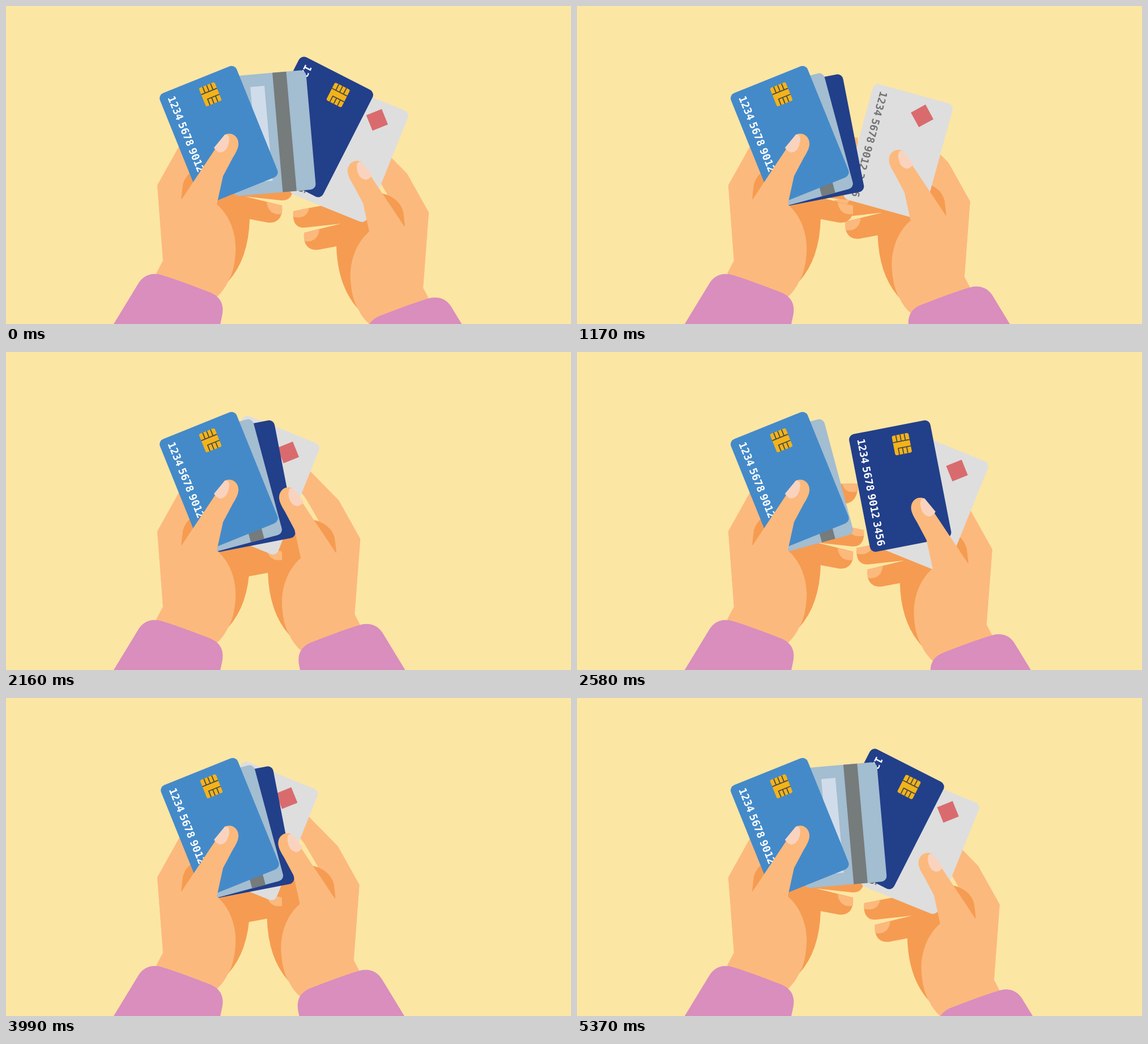
Animation of 997 by 561 pixels, one loop 5.4 s. Source, as an HTML page:

```html
<!DOCTYPE html>
<html lang="en">
<head>
<meta charset="utf-8">
<title>Passing cards</title>
<style>
  html, body { margin: 0; width: 100%; height: 100%; overflow: hidden; background: #fce6a4; }
  svg { display: block; width: 100vw; height: 100vh; }
  text { font: bold 18.4px "DejaVu Sans Mono", "Noto Sans Mono", monospace; word-spacing: -6px; white-space: pre; }
  .skin { fill: #fcb97d; }
  .shade { fill: #f59c52; }
  .nail { fill: #fad3bf; }
  .cuff { fill: #d98ebe; }
</style>
</head>
<body>
<svg viewBox="0 0 997 561" preserveAspectRatio="none">
  <defs>
    <rect id="plate" x="-73" y="-105.7" width="146" height="211.4" rx="10"/>
    <text id="digits" transform="translate(-59 -95) rotate(90)">1234 5678 9012 3456</text>
    <g id="chip">
      <rect x="-15" y="-17.5" width="30" height="35" rx="3" fill="#f2b31b"/>
      <path d="M-15-5.5H15M-7.5-17.5v12M0-17.5v12M7.5-17.5v12M15 6H-7.5V17.5M0 6V17.5M7.5 6V17.5"
            fill="none" stroke="#4a4a48" stroke-width="1.8"/>
    </g>

    <!-- fingers and palm behind the cards -->
    <g id="handBack">
      <path class="skin" d="M277 449L267 316 305 248 367 185 440 181Q455 196 440 211L405 214Q376 224 362 247L341 283 335 330 310 400Z"/>
      <path class="shade" d="M392 486Q428 446 430 376L462 382C480 384 489 372 487 352L422 336 486 343C502 344 508 332 506 314L466 306 414 297Q420 281 447 271L477 267C491 263 497 249 495 232L432 233Q420 236 410 247L375 300 352 282Q319 289 312 315L309 341 340 400Z"/>
      <path class="skin" d="M460 346L487 352 487 367Q463 370 460 346ZM478 308L506 314 506 324Q482 329 478 308ZM468 233L495 232 494 246Q474 251 468 233Z"/>
    </g>

    <!-- palm and thumb in front of the cards -->
    <g id="handFront">
      <path class="skin" d="M310 341L386 227C400 221 412 232 410 246Q409 254 400 268L383 300 372 350C398 372 407 408 405 435Q403 468 392 486Q384 503 371 514L340 530 265 472 277 449 267 316Z"/>
      <path class="nail" d="M367 250L386 227Q394 225 394 236Q392 257 378 258.5Q371 257 367 250Z"/>
    </g>
    <path id="cuff" class="cuff" d="M151 625L232 492Q244 470 268 473Q290 478 362 506Q388 518 381 548L372 590 366 625Z"/>
  </defs>

  <rect width="997" height="561" fill="#fce6a4"/>
  <g class="rightHand"><use href="#handBack"/></g>
  <use href="#handBack"/>

  <g id="grey">
    <use href="#plate" fill="#dedede"/>
    <use href="#digits" fill="#727476"/>
    <rect x="-14.7" y="-14.7" width="29.4" height="29.4" fill="#d96b6e" transform="translate(24 -72) rotate(46)"/>
  </g>
  <g id="navy">
    <use href="#plate" fill="#223f8a"/>
    <use href="#digits" fill="#fff"/>
    <use href="#chip" x="17" y="-72"/>
  </g>
  <g id="pale">
    <use href="#plate" fill="#a3bdd1"/>
    <rect x="-27" y="-84" width="25" height="168" fill="#d0dcea"/>
    <rect x="14" y="-105.7" width="24.5" height="211.4" fill="#767b7b"/>
  </g>
  <g id="blue">
    <use href="#plate" fill="#448ac9"/>
    <use href="#digits" fill="#fff"/>
    <use href="#chip" x="13.2" y="-72.5"/>
  </g>

  <use href="#handFront"/>
  <use href="#cuff"/>
  <g class="rightHand">
    <use href="#handFront"/>
    <use href="#cuff" x="-6.5" y="-6.5"/>
  </g>
</svg>
<script>
const LOOP = 5400;
const stops = [0, 760, 1425, 2105, 2625, 2990, 3510, 3950, 4496, 4930, 5380];

// Poses [x, y, angle]: f fanned, s stacked, r back at the stack, o pulled out.
// Each route names the pose reached at every stop.
const hand = {
  route: "fsorororosf",
  f: [0, 0, 0], s: [-140, -27, 0], r: [-124, -35, 0], o: [-11.3, -16, 0]
};
const cards = {
  grey: {
    route: "fsorororosf",
    f: [605.6, 258.6, 22], s: [443.5, 234, 1.3], r: [443.5, 234, 22], o: [624.5, 267.5, 22]
  },
  navy: {
    route: "frrrorororf",
    f: [538.3, 213.4, 27], r: [416.2, 236.5, -11], o: [573, 236.5, -11]
  },
  pale: {
    route: "frrrrrororf",
    f: [465.3, 224.3, -5], r: [391.2, 237.3, -15], o: [548.5, 237.3, -15]
  },
  blue: {
    route: "rrrrrrrrorr",
    r: [375.4, 228, -22], o: [522.4, 228, -22]
  }
};

const ease = u => (1 - Math.cos(Math.PI * u)) / 2;

function poseAt(track, t) {
  let i = 0;
  while (i < stops.length - 2 && t >= stops[i + 1]) i++;
  const u = ease(Math.min(1, (t - stops[i]) / (stops[i + 1] - stops[i])));
  const from = track[track.route[i]], to = track[track.route[i + 1]];
  return from.map((v, k) => v + (to[k] - v) * u);
}

const rightParts = document.querySelectorAll(".rightHand");

function draw(t) {
  const [hx, hy] = poseAt(hand, t);
  for (const part of rightParts)
    part.setAttribute("transform", `translate(${1013 + hx} ${48 + hy}) scale(-1 1)`);
  for (const id in cards) {
    const [x, y, angle] = poseAt(cards[id], t);
    document.getElementById(id).setAttribute("transform", `translate(${x} ${y}) rotate(${angle})`);
  }
}

const start = performance.now();
function tick() {
  draw((performance.now() - start) % LOOP);
  requestAnimationFrame(tick);
}
tick();
</script>
</body>
</html>
```
